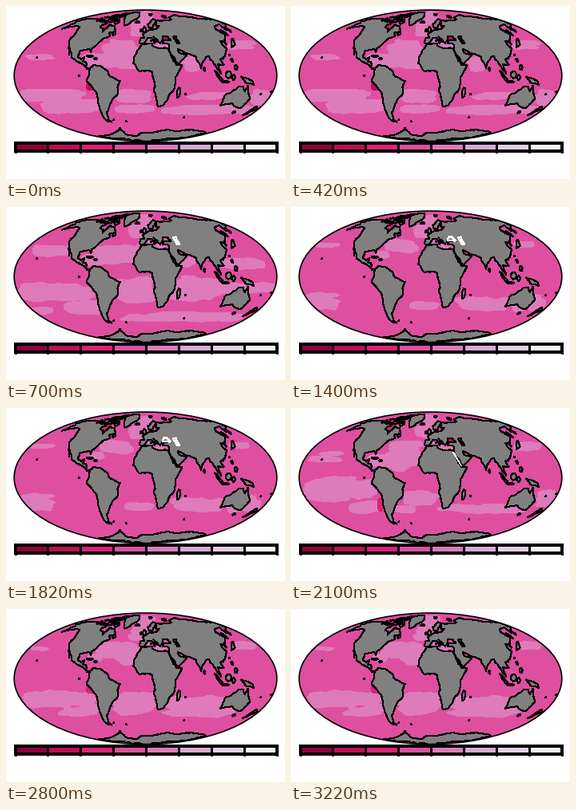
These frames come from a looping animation (349x217 px, 3.5 s). A matplotlib script:

```python
import numpy as np
import matplotlib.pyplot as plt
from matplotlib.animation import ArtistAnimation
from matplotlib.colors import to_rgba
from matplotlib.patches import Ellipse, Polygon, Rectangle

W, H = 349, 217
CX, CY, RX, RY = 174.5, 87.3, 164.3, 82.3
SHADES = ["#91003f", "#bd0f52", "#dd2277", "#df4fa0",
          "#de7bbb", "#d9a9d2", "#e4cfe3", "#f5f3f8"]
RED, ROSE, BASE, LIGHT = SHADES[1:5]
GRAY = "#808080"

fig = plt.figure(figsize=(W / 100, H / 100), dpi=100, facecolor="white")
ax = fig.add_axes([0, 0, 1, 1])
ax.axis("off")
globe = Ellipse((CX, CY), 2 * RX, 2 * RY, facecolor=BASE, edgecolor="none", zorder=0)
ax.add_patch(globe)


def mollweide(flat):
    lon, lat = np.radians(np.reshape(flat, (-1, 2)).astype(float)).T
    t = lat.copy()
    for _ in range(30):
        t -= (2 * t + np.sin(2 * t) - np.pi * np.sin(lat)) / (2 + 2 * np.cos(2 * t) + 1e-6)
    return np.column_stack([CX + RX * lon / np.pi * np.cos(t), CY - RY * np.sin(t)])


def crinkle(pts, rng, amp=0.7):
    """Add small bays and capes between the points of an outline."""
    out = []
    for a, b in zip(pts, np.roll(pts, -1, axis=0)):
        n = max(1, int(np.hypot(*(b - a)) / 3))
        for k in range(n):
            out.append(a + (b - a) * k / n + (rng.uniform(-amp, amp, 2) if k else 0))
    return np.array(out)


def add(points, color, z, edge="none", width=0.0):
    patch = Polygon(points, closed=True, facecolor=color, edgecolor=edge,
                    linewidth=width, antialiased=False, zorder=z)
    ax.add_patch(patch)
    patch.set_clip_path(globe)
    return patch


def blot(x, y, rx, ry, color, z=2):
    patch = Ellipse((x, y), 2 * rx, 2 * ry, facecolor=color, edgecolor="none",
                    antialiased=False, zorder=z)
    ax.add_patch(patch)
    return patch


# Coastlines as lon, lat pairs.
america_east = [
    -168, 66, -156, 71, -128, 70, -96, 68, -94, 72, -82, 68, -94, 61, -93, 58, -82, 55,
    -79, 51, -77, 57, -78, 62, -69, 59, -65, 60, -56, 52, -66, 50, -61, 46, -70, 43,
    -76, 35, -81, 31, -80, 26, -84, 30, -97, 28, -97, 21, -91, 18.5, -87, 21, -88, 16,
    -83, 15, -82, 9, -77, 8]
america_west = [
    -80, 7, -88, 13, -97, 16, -105, 20, -114, 31, -110, 23, -118, 34, -124, 40, -124, 47,
    -134, 58, -145, 60, -163, 55, -161, 64]
south_america = [
    -77, 8, -72, 12, -62, 10.5, -52, 5, -50, 0, -35, -6, -39, -13, -40, -21, -48, -26,
    -57, -36, -65, -43, -68, -52, -65, -55, -74, -52, -73, -38, -70, -18, -81, -6, -77, 3]
africa = [
    -6, 36, 10, 37, 11, 34, 20, 31, 33, 31, 37, 22, 43, 12, 51, 12, 41, -2, 40, -15,
    35, -20, 32, -28, 27, -34, 19, -35, 12, -17, 13, -9, 9, 4, 4, 6, -8, 4.5, -17, 14,
    -16, 22, -9, 31]
europe_north = [
    -9, 37, -9, 43, -2, 43.5, -5, 48, 8, 54, 10, 57.5, 11, 54, 20, 55, 29, 60, 22, 60,
    25, 65.5, 17, 61, 13, 55.5, 6, 58, 5, 62, 20, 70, 41, 67, 33, 66.5, 44, 68, 68, 69,
    70, 73, 104, 77.5, 113, 74, 140, 72.5, 179, 69]
asia_east = [
    178, 62, 163, 58, 157, 51, 156, 57, 163, 62, 143, 59, 136, 55, 140, 48, 129, 41,
    126, 35, 121, 40, 119, 35, 122, 30, 114, 22, 106, 18, 109, 12, 101, 13, 104, 1.5,
    98, 9, 94, 16, 91, 22]
asia_south = [
    87, 21, 80, 15, 77, 8, 72, 21, 57, 26, 48, 30, 51, 25, 59, 22.5, 45, 13, 35, 28,
    36, 36, 27, 37, 30, 41, 41, 41, 37, 46, 30, 46, 28, 41, 23, 37, 13, 45.5, 18, 40,
    16, 38, 10, 44, 4, 43.5, -2, 37]
australia = [
    114, -22, 122, -18, 131, -12, 136, -12, 140, -17.5, 142, -11, 146, -19, 153, -26,
    150, -37, 138, -35, 131, -31.5, 115, -34]
antarctica = [
    -180, -78, -150, -77, -100, -73, -66, -67, -58, -63, -61, -74, -30, -77, -15, -72,
    35, -69, 52, -66, 78, -69, 112, -66, 150, -68.5, 168, -71, 165, -78, 180, -90, -180, -90]
greenland = [-73, 78, -60, 82, -32, 83.5, -20, 74, -24, 70, -44, 60, -54, 68]
new_guinea = [131, -1, 147, -6, 150, -10.5, 138, -8]
japan = [130, 32, 139, 35, 145, 43, 140, 41, 136, 37]
baffin = [-90, 73, -80, 73.5, -62, 66, -66, 62, -74, 65]
new_zealand = [173, -35, 178, -38, 167, -46]
sumatra = [95, 5.5, 106, -4, 104, -6]
caspian_shore = [47, 45, 53, 46, 51, 43, 54, 37, 50, 37]

rng = np.random.default_rng(4)
for shore in (america_east + america_west, south_america, africa,
              europe_north + asia_east + asia_south, australia, antarctica, greenland,
              new_guinea, japan, baffin, new_zealand, sumatra):
    add(crinkle(mollweide(shore), rng), GRAY, 3, "black", 0.75)


def island(lon, lat, w, h):
    a = np.arange(7) * 2 * np.pi / 7
    ring = np.column_stack([lon + w * np.cos(a), lat + h * np.sin(a)])
    add(mollweide(ring), GRAY, 3, "black", 0.75)


north_isles = [(-19, 65, 5, 1.4), (-2, 54, 3, 4), (-8, 53, 2, 1.7), (18, 78, 6, 1.5),
               (58, 74, 5, 2.5), (-56, 49, 3, 2), (143, 50, 1, 4), (-80, 78, 10, 3)]
warm_isles = [(47, -19, 2.5, 6), (114, 1, 4, 4), (110, -7, 5, 1), (121, -2, 2, 3),
              (122, 17, 1.5, 2), (125, 9, 2, 3), (-80, 22, 5, 1), (-71, 19, 2, 1),
              (81, 7, 1, 2), (146, -42, 2, 1.5)]
specks = [(121, 23), (110, 19), (69, -49), (-59, -52), (14, 37.5), (9, 40), (165, -21),
          (-155, 20), (178, -18), (-37, -54), (57, -21), (-91, 0)]
for spot in north_isles + warm_isles:
    island(*spot)
for lon, lat in specks:
    island(lon, lat, 0.7, 0.5)
for _ in range(34):
    island(rng.uniform(-122, -72), rng.uniform(66, 78),
           rng.uniform(1, 4), rng.uniform(0.5, 1.3))

caspian = mollweide(caspian_shore)
black_sea = mollweide([28, 42, 41, 41, 37, 46, 31, 46])
red_sea = mollweide([33, 29, 35, 28, 43, 13, 37, 22])
hudson = mollweide([-94, 61, -80, 63, -78, 58, -80, 53, -88, 57])
add(caspian, BASE, 4, "black", 0.75)

ax.add_patch(Ellipse((CX, CY), 2 * RX, 2 * RY, fill=False, linewidth=1.2, zorder=8))

# Colour scale.
step = 327 / 8
for i, shade in enumerate(SHADES):
    ax.add_patch(Rectangle((11 + i * step, 172), step, 10, facecolor=shade,
                           edgecolor="none", antialiased=False, zorder=9))
for i in range(9):
    ax.plot([11.5 + i * step] * 2, [171, 183], color="black", lw=0.75,
            antialiased=False, zorder=10)
ax.add_patch(Rectangle((11.5, 172), 327, 9.5, fill=False, lw=1.5,
                       antialiased=False, zorder=10))

yy, xx = np.mgrid[0:H, 0:W] + 0.5


def patches(blobs, seed):
    """Paint the union of soft blobs with uneven, mostly horizontal edges."""
    r = np.random.default_rng(seed)
    noise = np.zeros((H, W))
    for cw, ch, amp in ((24, 8, 0.5), (10, 4, 0.35), (3, 2, 0.15)):
        cells = r.uniform(-amp, amp, (H // ch + 1, W // cw + 1))
        noise += np.kron(cells, np.ones((ch, cw)))[:H, :W]
    noise = sum(np.roll(noise, (i, 2 * j), (0, 1))
                for i in (-1, 0, 1) for j in (-2, -1, 0, 1, 2)) / 15
    field = np.full((H, W), -9.0)
    for x, y, rx, ry in blobs:
        field = np.maximum(field, 1 - np.abs((xx - x) / rx) ** 3 - np.abs((yy - y) / ry) ** 3)
    rgba = np.zeros((H, W, 4))
    rgba[field + noise > 0] = to_rgba(LIGHT)
    image = ax.imshow(rgba, extent=(0, W, H, 0), interpolation="nearest",
                      aspect="auto", zorder=1)
    image.set_clip_path(globe)
    return image


# Lighter water as centre and half sizes.
norwegian = [(174, 17, 12, 9), (164, 30, 10, 9), (184, 48, 18, 6)]
gulf = [(108, 67, 13, 8)]
tasman = [(319, 114, 13, 11)]
north_pacific = [(296, 49, 18, 6), (42, 64, 20, 4)]
north_atlantic = [(143, 60, 22, 19), (124, 68, 18, 8)]
water = [
    norwegian + gulf + tasman + north_pacific + north_atlantic + [
        (55, 112, 42, 8), (84, 126, 42, 9), (160, 113, 24, 8), (158, 130, 30, 6),
        (255, 130, 56, 6), (252, 113, 24, 5), (232, 73, 11, 9)],
    norwegian + gulf + [
        (56, 55, 24, 8), (138, 59, 26, 11), (56, 106, 50, 12), (98, 127, 26, 9),
        (42, 130, 18, 5), (162, 106, 26, 17), (236, 103, 32, 15), (296, 102, 42, 7),
        (298, 71, 30, 7), (226, 70, 12, 8), (230, 138, 84, 6)],
    norwegian + [
        (138, 49, 20, 9), (114, 60, 12, 5), (38, 119, 26, 11), (168, 123, 19, 6),
        (238, 121, 34, 9), (297, 121, 20, 11), (44, 48, 17, 3), (292, 47, 13, 4)],
    norwegian + gulf + tasman + north_pacific + north_atlantic + [
        (62, 102, 46, 15), (96, 124, 24, 8), (160, 113, 25, 9), (240, 126, 54, 6),
        (50, 57, 15, 3), (142, 127, 14, 5)],
    norwegian + [
        (140, 53, 26, 11), (112, 61, 10, 5), (154, 64, 11, 6), (66, 114, 50, 11),
        (94, 128, 28, 7), (162, 118, 28, 14), (240, 122, 46, 13), (296, 46, 15, 5),
        (40, 50, 12, 3)]]

frames = []
for i, blobs in enumerate(water):
    art = [patches(blobs, 20 + i)]
    if i in (0, 2, 3):
        art.append(add(hudson, ROSE, 2))
    if i in (0, 3):
        art += [add(black_sea, RED, 2), add(caspian, RED, 5, "black", 0.75)]
    if i in (0, 4):
        art.append(blot(106, 101, 6, 5, RED if i == 0 else ROSE))
    if i == 3:
        art += [blot(112, 121, 4, 9, ROSE), add(red_sea, "white", 4)]
    if i in (1, 2):
        art.append(add(caspian, GRAY, 5, "white", 1))
    if i == 2:
        art.append(add(black_sea, GRAY, 5, "white", 1))
    frames.append(art)

ax.set_xlim(0, W)
ax.set_ylim(H, 0)
ani = ArtistAnimation(fig, frames, interval=700, repeat=True, repeat_delay=0, blit=False)
plt.show()
```
